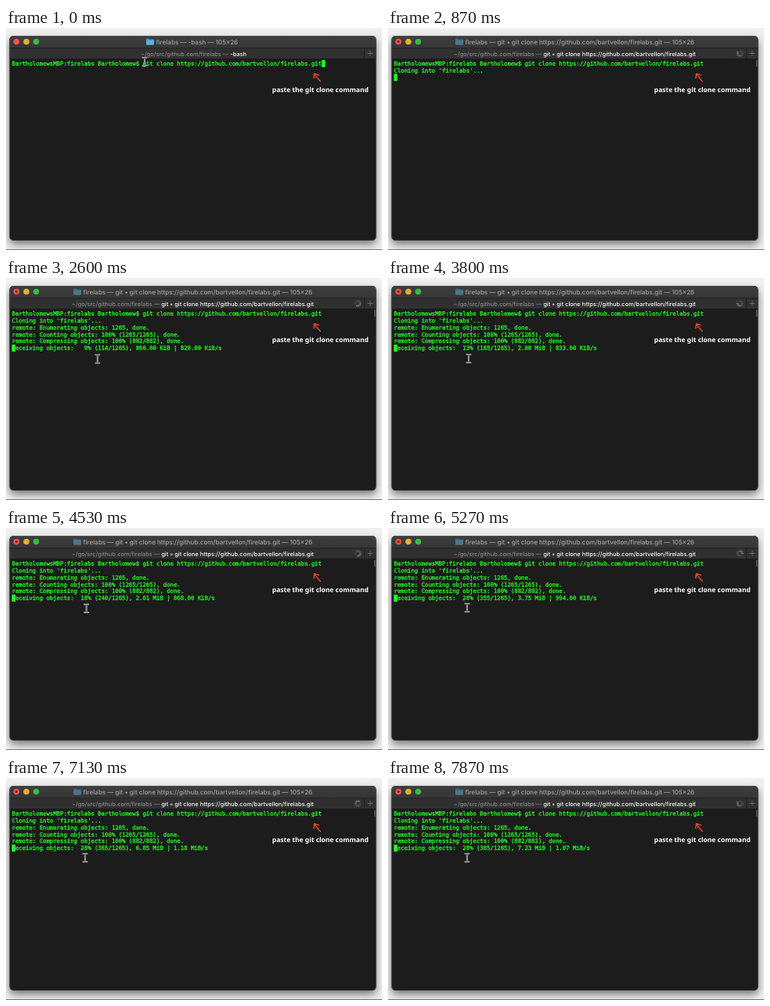
Animation, 480 px wide and 284 px high, one loop 8 s. Source, as an HTML page:

```html
<!DOCTYPE html>
<html lang="en">
<head>
<meta charset="utf-8">
<title>Cloning a repository</title>
<style>
  html, body { margin: 0; width: 100%; height: 100%; overflow: hidden; background: #eee; }
  svg { display: block; width: 480px; height: 284px; }
  text { text-rendering: geometricPrecision; white-space: pre; }
  .soft { filter: blur(.3px); }
  .term { font: 7.3px "DejaVu Sans Mono", monospace; fill: #26f826; stroke: #26f826; stroke-width: .32px; }
  .title { font: 500 8.05px Inter, sans-serif; fill: #a0a0a1; }
  .tab { font: 500 7.44px Inter, sans-serif; fill: #858586; }
  .tab .cmd { fill: #f4f4f4; }
  .note { font: 700 8.47px "Noto Sans", sans-serif; fill: #fff; }
</style>
</head>
<body>
<svg viewBox="0 0 480 284">
  <defs>
    <filter id="shadow" x="-10%" y="-10%" width="120%" height="125%">
      <feDropShadow dx="0" dy="5" stdDeviation="5.5" flood-opacity=".5"/>
    </filter>
    <linearGradient id="bar" x2="0" y2="1">
      <stop offset="0" stop-color="#3e3e3f"/><stop offset="1" stop-color="#363637"/>
    </linearGradient>
    <clipPath id="frame"><rect x="4.5" y="10" width="468" height="262" rx="5"/></clipPath>
  </defs>
  <rect width="480" height="284" fill="#f0f0f0"/>
  <rect x="4.5" y="10" width="468" height="262" rx="5" fill="#1a1a1a" filter="url(#shadow)"/>
  <g clip-path="url(#frame)">
    <rect x="4" y="10" width="469" height="16" fill="url(#bar)"/>
    <rect x="4" y="26" width="469" height="13.5" fill="#303031"/>
    <path d="M4 25.8H473M4 39.5H473M457.5 26V39.5" stroke="#1c1c1d" stroke-width=".7"/>
    <rect x="4.5" y="10" width="468" height="262" rx="5" fill="none" stroke="#555" stroke-width="1.2"/>
  </g>
  <rect y="283" width="480" height="1" fill="#777"/>
  <g class="soft">
    <circle cx="13.3" cy="17.5" r="3.8" fill="#f0524b"/>
    <circle cx="26" cy="17.5" r="3.8" fill="#e3b02c"/>
    <circle cx="38.5" cy="17.5" r="3.8" fill="#37bd3e"/>
    <circle id="dot" cx="13.3" cy="17.5" r="1.4" fill="#7a150f"/>
    <g id="folder">
      <path d="M0 1.2Q0 .4.8.4H3.6L4.6 1.5H9.2Q10 1.5 10 2.3V7.6Q10 8.4 9.2 8.4H.8Q0 8.4 0 7.6Z" fill="#3f97c6"/>
      <path d="M0 2.8H10V7.6Q10 8.4 9.2 8.4H.8Q0 8.4 0 7.6Z" fill="#5db4df"/>
    </g>
    <text id="title" class="title" y="20.5"></text>
    <text id="tab" class="tab" y="35.6"><tspan>~/go/src/github.com/firelabs — </tspan><tspan id="cmd" class="cmd"></tspan></text>
    <path d="M461.5 32.5H468.5M465 29V36" stroke="#747475" stroke-width=".8"/>
    <g id="spinner" transform="translate(449.3 32.6)" stroke="#9a9a9a" stroke-width=".9" stroke-linecap="round"></g>
    <rect id="scroll" x="470" y="41" width="1.4" height="8.5" fill="#5c5c5c"/>
    <g id="lines"></g>
  </g>
  <rect id="caret" width="4.6" height="9" fill="#26f826"/>
  <path d="M401.4 68.3Q398 65 393.8 58.8M393 64.2L393.5 58.4L399.2 60.2" fill="none" stroke="#f2482d" stroke-width="1.4" stroke-linecap="round" stroke-linejoin="round"/>
  <text class="note" x="339.8" y="81.8">paste the git clone command</text>
  <g id="mouse" class="soft" fill="none" stroke-linecap="round">
    <path d="M-2.4-5.2Q0-5.2 0-3.6Q0-5.2 2.4-5.2M0-3.6V3.6M-2.4 5.2Q0 5.2 0 3.6Q0 5.2 2.4 5.2" stroke="#c2c2c2" stroke-width="2.1"/>
    <path d="M-2.4-5.2Q0-5.2 0-3.6Q0-5.2 2.4-5.2M0-3.6V3.6M-2.4 5.2Q0 5.2 0 3.6Q0 5.2 2.4 5.2" stroke="#3a3a3a" stroke-width=".7"/>
  </g>
</svg>
<script>
const LOOP = 8000, X = 7.5, Y = 48, ROW = 8.85, CHAR = 4.395;
const START = 400, RETITLE = 530, HIDE = 330, SHOW = 1330;
const el = id => document.getElementById(id);
const svg = (name, attrs, parent) => {
  const node = document.createElementNS("http://www.w3.org/2000/svg", name);
  for (const k in attrs) node.setAttribute(k, attrs[k]);
  return parent.appendChild(node);
};

const command = "git clone https://github.com/bartvellon/firelabs.git";
const prompt = "BartholomewsMBP:firelabs Bartholomew$ " + command;

// [time, text]
const output = [
  [0, prompt],
  [START, "Cloning into 'firelabs'..."],
  [1000, "remote: Enumerating objects: 1265, done."],
  [1070, "remote: Counting objects: 100% (1265/1265), done."],
  [1200, "remote: Compressing objects: 100% (882/882), done."]
];

// [time, objects, size and rate]
const progress = [
  [1330, 1, ""],
  [1470, 13, ""],
  [1600, 102, "572.00 KiB | 1.06 MiB/s"],
  [2130, 114, "860.00 KiB | 820.00 KiB/s"],
  [2670, 127, "1.18 MiB | 780.00 KiB/s"],
  [3200, 152, "1.62 MiB | 801.00 KiB/s"],
  [3730, 165, "2.08 MiB | 833.00 KiB/s"],
  [4270, 240, "2.61 MiB | 868.00 KiB/s"],
  [4730, 304, "3.18 MiB | 925.00 KiB/s"],
  [5200, 355, "3.75 MiB | 994.00 KiB/s"],
  [5670, 358, "4.90 MiB | 1.12 MiB/s"],
  [6200, 365, "6.67 MiB | 1.24 MiB/s"],
  [6730, 365, "6.85 MiB | 1.18 MiB/s"],
  [7270, 365, "7.05 MiB | 1.12 MiB/s"],
  [7800, 365, "7.23 MiB | 1.07 MiB/s"]
];

// [time, x, y]
const pointer = [
  [0, 177, 43], [1330, 177, 43], [1670, 197, 87], [1800, 188, 103],
  [2130, 150, 107], [2670, 112, 103], [3470, 103, 103], [4400, 103, 103], [5100, 101, 102]
];

const rows = Array.from({ length: 6 }, (_, i) =>
  svg("text", { class: "term", x: X, y: Y + i * ROW }, el("lines")));
const spokes = Array.from({ length: 12 }, (_, i) =>
  svg("line", { y1: -2.4, y2: -4.1, transform: `rotate(${i * 30})` }, el("spinner")));

const show = (node, on) => node.setAttribute("visibility", on ? "visible" : "hidden");
const put = (node, text) => { if (node.textContent !== text) node.textContent = text; };

function status(t) {
  const step = progress.filter(p => p[0] <= t).pop();
  if (!step) return "";
  const [, n, rate] = step;
  const percent = String(Math.floor(n * 100 / 1265)).padStart(3);
  return `Receiving objects: ${percent}% (${n}/1265)${rate && ", " + rate}`;
}

function pointerAt(t) {
  const i = pointer.findIndex(p => p[0] > t);
  if (i < 0) return pointer[pointer.length - 1].slice(1);
  const a = pointer[i - 1], b = pointer[i], k = (t - a[0]) / (b[0] - a[0]);
  return [a[1] + (b[1] - a[1]) * k, a[2] + (b[2] - a[2]) * k];
}

function draw(t) {
  const busy = t >= RETITLE;
  put(el("title"), `firelabs — ${busy ? "git • " + command : "-bash"} — 105×26`);
  put(el("cmd"), busy ? "git • " + command : "-bash");
  el("title").setAttribute("x", busy ? 98.5 : 191.5);
  el("tab").setAttribute("x", busy ? 84 : 172);
  el("folder").setAttribute("transform", `translate(${busy ? 86 : 179} 13)`);
  el("folder").setAttribute("opacity", busy ? .5 : 1);
  for (const id of ["dot", "spinner", "scroll"]) show(el(id), busy);

  const turn = Math.floor(t / 1000 * 12);
  spokes.forEach((s, i) => s.setAttribute("opacity", 1 - ((turn - i) % 12 + 12) % 12 * .075));

  const lines = output.filter(l => l[0] <= t).map(l => l[1]);
  const row = t < START ? 0 : lines.length;
  const text = status(t);
  if (text) lines.push(text);
  rows.forEach((r, i) => put(r, lines[i] || ""));
  el("caret").setAttribute("x", row ? X : X + prompt.length * CHAR);
  el("caret").setAttribute("y", Y + row * ROW - 7);

  show(el("mouse"), t < HIDE || t >= SHOW);
  el("mouse").setAttribute("transform", `translate(${pointerAt(t).join(" ")})`);
}

const begin = performance.now();
(function tick() {
  draw((performance.now() - begin) % LOOP);
  requestAnimationFrame(tick);
})();
</script>
</body>
</html>
```
